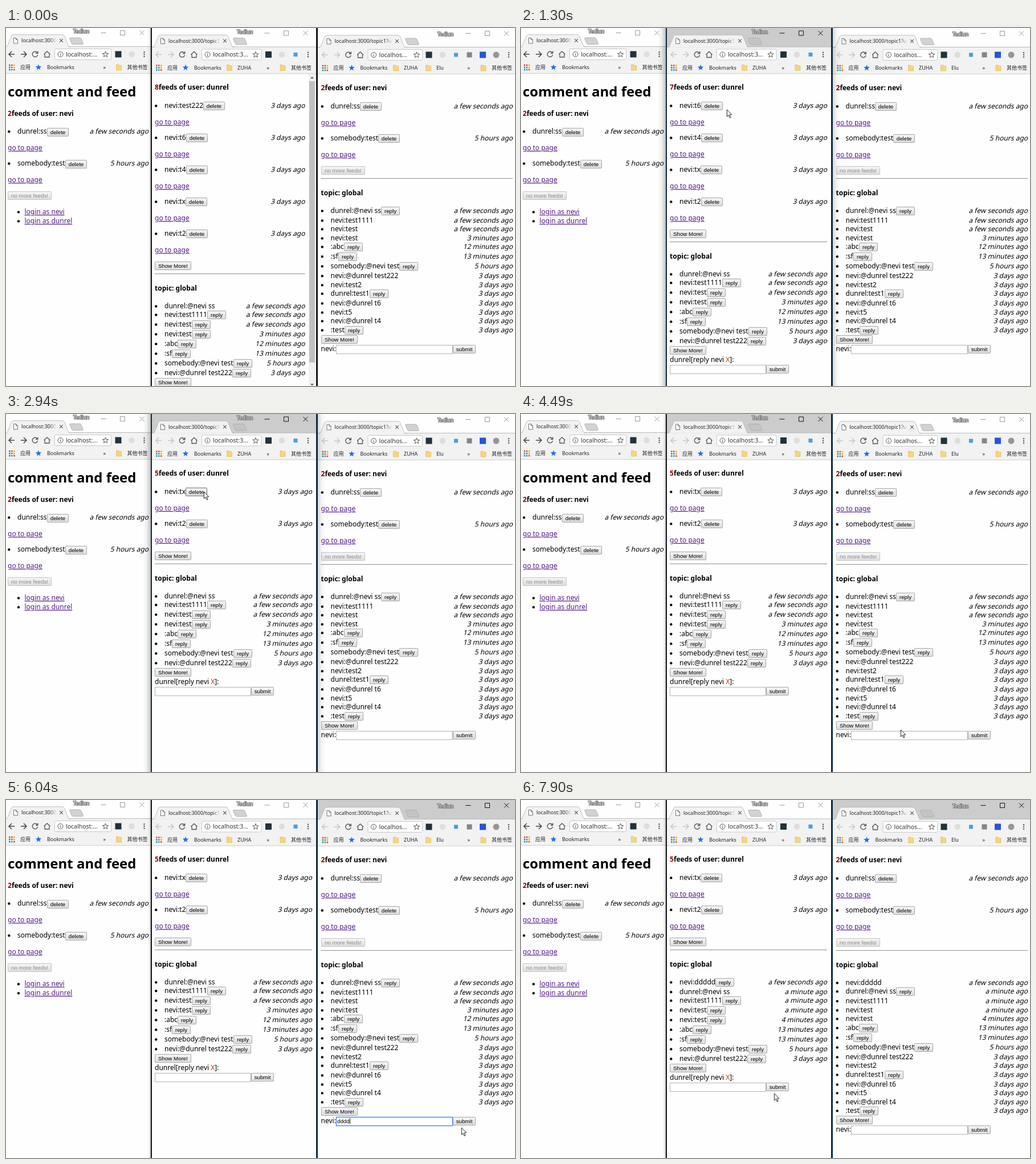
An HTML page for the animation above (7990 ms loop, 893 px wide and 627 px high).

```html
<!DOCTYPE html>
<html lang="en">
<head>
<meta charset="utf-8">
<title>Comments and feeds</title>
<style>
  html, body { margin: 0; width: 100%; height: 100%; overflow: hidden; background: #fff; }
  svg { display: block; width: 893px; height: 627px; }
  text { font: 12px "Noto Sans", "Noto Sans CJK SC", "Noto Sans CJK", sans-serif; white-space: pre; }
  .b { font-weight: 700; }
  .h1 { font-size: 24px; font-weight: 700; }
  .ui { font-size: 9px; fill: #222; }
  .url { font-size: 10.5px; fill: #333; }
  .btn { font: 9.75px "Liberation Sans", Arial, sans-serif; }
  .name { font-size: 9px; fill: #fff; stroke: #555; stroke-width: 1.6px; paint-order: stroke; stroke-linejoin: round; }
  .link { fill: #551a8b; text-decoration: underline; }
</style>
</head>
<body>
<svg id="stage" viewBox="0 0 893 627" xmlns="http://www.w3.org/2000/svg">
  <defs>
    <linearGradient id="face" x2="0" y2="1"><stop stop-color="#f6f6f6"/><stop offset="1" stop-color="#dddddd"/></linearGradient>
    <linearGradient id="fade"><stop stop-color="#f2f2f2" stop-opacity="0"/><stop offset="1" stop-color="#f2f2f2"/></linearGradient>
    <linearGradient id="dark"><stop stop-color="#000" stop-opacity="0"/><stop offset=".5" stop-color="#000" stop-opacity=".06"/><stop offset="1" stop-color="#000" stop-opacity=".25"/></linearGradient>
    <clipPath id="mid"><rect x="254" width="290" height="627"/></clipPath>
    <clipPath id="left"><rect width="254" height="627"/></clipPath>
  </defs>
  <g id="scene"></g>
</svg>
<script>
const LOOP = 7990;
const scene = document.getElementById('scene');
const pen = document.createElement('canvas').getContext('2d');
pen.font = '12px "Noto Sans", sans-serif';
const widthOf = s => pen.measureText(s).width;

const A = 'nevi', B = 'dunrel';
const BTN_W = { delete: 38, reply: 33, submit: 40, 'Show More!': 64, 'no more feeds!': 77 };

// text, age before the new comment, age after it
const COMMENTS = [
  [`${B}:@${A} ss`, 'a few seconds', 'a minute'],
  [`${A}:test1111`, 'a few seconds', 'a minute'],
  [`${A}:test`, 'a few seconds', 'a minute'],
  [`${A}:test`, '3 minutes', '4 minutes'],
  [':abc', '12 minutes', '13 minutes'],
  [':sf', '13 minutes'],
  [`somebody:@${A} test`, '5 hours'],
  ...[`${A}:@${B} test222`, `${A}:test2`, `${B}:test1`, `${A}:@${B} t6`,
      `${A}:t5`, `${A}:@${B} t4`, ':test'].map(s => [s, '3 days'])
];
const MY_FEEDS = [[`${B}:ss`, 'a few seconds'], ['somebody:test', '5 hours']];
const B_FEEDS = ['test222', 't6', 't4', 'tx', 't2'].map(s => [`${A}:${s}`, '3 days']);

// start, end, steps, x, y
const MOVES = [
  [70, 760, 10, 362, 146], [910, 1080, 3, 361, 143], [1760, 1930, 3, 347, 136],
  [3400, 4020, 9, 667, 553], [4190, 4190, 1, 666, 553], [4740, 4960, 4, 666, 551],
  [5800, 6040, 4, 799, 574], [6190, 6290, 2, 803, 566], [6680, 6680, 1, 804, 567],
  [7370, 7900, 8, 444, 514]
];
const DELETES = [1300, 2160, 2940];
const KEYS = [5570, 5650, 5720, 5800, 6450];

let mouse = { x: 0, y: 0 };

function mouseAt(t) {
  let x = 854, y = 664;
  for (const [t0, t1, n, tx, ty] of MOVES) {
    if (t < t0) break;
    const k = Math.floor((t - t0) / (t1 - t0 || 1) * (n - 1)) + 1;
    const p = n === 1 ? 1 : Math.min(1, k / n);
    x += (tx - x) * p;
    y += (ty - y) * p;
  }
  return { x, y };
}

const rect = (x, y, w, h, fill, more = '') =>
  `<rect x="${x}" y="${y}" width="${w}" height="${h}" fill="${fill}" ${more}/>`;
const line = (d, color, w = 1) => `<path d="${d}" fill="none" stroke="${color}" stroke-width="${w}"/>`;
const dot = (x, y, r, fill) => `<circle cx="${x}" cy="${y}" r="${r}" fill="${fill}"/>`;
// y is the middle of the capitals, baselines sit on whole pixels
const base = y => Math.round(y + 4.3);
const text = (x, y, s, cls = '') => `<text x="${x}" y="${base(y)}" class="${cls}">${s}</text>`;
const small = (x, y, s, cls = 'ui') => `<text x="${x}" y="${Math.round(y + 3.2)}" class="${cls}">${s}</text>`;
const bullet = (x, y) => dot(x, base(y) - 3.6, 2.2, '#000');
const age = (x, y, s) =>
  `<text transform="translate(${x} ${base(y)}) skewX(-13)" text-anchor="end">${s} ago</text>`;

function button(left, y, label, off) {
  const x = Math.round(left), top = Math.round(y - 7.5), w = BTN_W[label];
  const hot = mouse.x >= x && mouse.x < x + w && mouse.y >= top && mouse.y < top + 15;
  const edge = off ? '#c4c4c4' : hot ? '#707070' : '#a6a6a6';
  return rect(x + 0.5, top + 0.5, w - 1, 14, 'url(#face)', `stroke="${edge}" rx=".8"`) +
    `<text x="${x + w / 2}" y="${top + 11}" class="btn" text-anchor="middle" fill="${off ? '#8c8c8c' : '#000'}">${label}</text>`;
}

const field = (x, y, w, focus) =>
  rect(x + 0.5, Math.round(y - 8) + 0.5, w - 1, 15, '#fff',
    `stroke="${focus ? '#4d8df0' : '#b4b4b4'}" stroke-width="${focus ? 1.5 : 1}"`);

function feedList(x, right, y, user, count, feeds, more) {
  let s = text(x, y - 31.5, `<tspan fill="#8b0000">${count}</tspan>feeds of user: ${user}`, 'b');
  feeds.forEach(([label, when], i) => {
    const fy = y + 56 * i;
    s += bullet(x + 2.3, fy) + text(x + 17, fy, label) +
      button(x + 17 + widthOf(label), fy + 1, 'delete') +
      age(right, fy, when) + text(x, fy + 29, 'go to page', 'link');
  });
  return s + button(x, y + 0.7 + 56 * feeds.length, more, more[0] === 'n');
}

function topic(x, right, y, user, rows, sent) {
  let s = rect(x, Math.round(y - 56), right - x, 1, '#8f8f8f') + text(x, y - 31, 'topic: global', 'b');
  const list = COMMENTS.slice(0, rows);
  if (sent) list.unshift([`${A}:ddddd`, 'a few seconds']);
  for (const [label, before, after] of list) {
    const reply = !label.startsWith(user + ':');
    s += bullet(x + 2.3, y) + text(x + 17, y, label) + age(right, y, sent && after || before);
    if (reply) s += button(x + 17 + widthOf(label), y + 1, 'reply');
    y += reply ? 17 : 15.5;
  }
  return { y, svg: s + button(x, y, 'Show More!') };
}

function star(x, y, r, attrs) {
  let d = '';
  for (let i = 0; i < 10; i++) {
    const a = Math.PI * i / 5, q = i % 2 ? r * 0.42 : r;
    d += `${i ? 'L' : 'M'}${(x + q * Math.sin(a)).toFixed(2)} ${(y - q * Math.cos(a)).toFixed(2)}`;
  }
  return `<path d="${d}z" ${attrs}/>`;
}

const folder = (x, y) =>
  `<path d="M${x - 4.5} ${y - 5}h4l1 1.5h4v8.5h-9z" fill="#f6d67a" stroke="#dfb44e" stroke-width=".6"/>`;
const arrow = (x, y, dir, color) =>
  line(`M${x - 5 * dir} ${y}h${10 * dir}M${x} ${y - 5}l${5 * dir} 5l${-5 * dir} 5`, color, 1.5);

// Browser frame: tab strip, toolbar and bookmarks
function chrome(w, active) {
  const { x, y, end } = w;
  const ink = active ? '#111' : '#999', grey = '#555';
  const tab = w.close + 1;
  let s = rect(w.from, 0, w.to - w.from, 33 + y, active ? '#cccccc' : '#fefefe') +
    rect(w.from, 33 + y, w.to - w.from, 47, '#f2f2f2') +
    line(`M${w.from} ${32.5 + y}H${w.to}`, '#b9b9b9') +
    line(`M${w.from} ${79.5 + y}H${w.to}`, '#cfcfcf') +
    `<path d="M${x - 1} ${33.2 + y}c3 0 3-1 4-3l6-15q1.5-3.5 4-3.5H${tab + 1}q2.500 0 4 3.500l6 15c1 2 1 3 4 3" fill="#f2f2f2" stroke="#b2b2b2" stroke-width=".8"/>` +
    `<path d="M${tab + 15} ${17 + y}h16q2 0 3 2l3 7q1 2.5-1 2.5h-16q-2 0-3-2l-3-7q-1-2.5 1-2.5z" fill="${active ? '#c4c4c4' : '#d2d2d2'}" stroke="#a9a9a9" stroke-width=".8"/>` +
    `<path d="M${x + 13.5} ${17.5 + y}h4l3 3v6.5h-7zM${x + 17.5} ${17.5 + y}v3h3" fill="#fff" stroke="#666" stroke-width=".9"/>` +
    small(x + 27, 22 + y, w.title) +
    rect(w.close - 21, 14 + y, 13, 16, 'url(#fade)') + rect(w.close - 8, 14 + y, 10, 16, '#f2f2f2') +
    line(`M${w.close - 2.8} ${19.2 + y}l5.6 5.6m0-5.6l-5.6 5.6`, grey, 1.1) +
    small(w.name, w.nameY, 'Tedlun', 'name');
  const cy = w.ctrlY, [mn, mx, cl] = w.ctrl;
  s += line(`M${mn - 4.5} ${cy}h9M${mx - 4} ${cy - 4}h8v8h-8zM${cl - 4} ${cy - 4}l8 8m0-8l-8 8`, ink);

  const ty = 46 + y, nav = w.history ? '#444' : '#c6c6c6';
  s += arrow(x + 10, ty, -1, nav) + arrow(x + 31, ty, 1, nav) +
    line(`M${x + 54.8} ${ty - 2.8}a4.7 4.7 0 1 0 .8 3.6M${x + 55.8} ${ty - 5.5}v3.8h-3.8`, grey, 1.4) +
    line(`M${x + 66.5} ${ty}l5.5-5l5.5 5M${x + 68} ${ty - 0.5}v5.5h8v-5.5`, grey, 1.3) +
    rect(x + 85.5, ty - 9.5, w.star + 10 - x - 85.5, 19, '#fff', 'rx="2" stroke="#bdbdbd" stroke-width=".8"') +
    `<circle cx="${x + 95.5}" cy="${ty}" r="4.5" fill="none" stroke="${grey}"/>` +
    line(`M${x + 95.5} ${ty - 2.6}v1.2m0 1v3`, grey, 1.1) +
    `<text x="${x + 105}" y="${Math.round(ty + 3.7)}" class="url">${w.url}</text>` +
    star(w.star, ty + 0.3, 5.4, `fill="none" stroke="${grey}"`);
  for (const [ix, color, r, round] of w.icons) {
    s += round ? dot(ix, ty, r, color) : rect(ix - r, ty - r, 2 * r, 2 * r, color);
  }
  for (let i = -1; i < 2; i++) s += dot(end - 10, ty + i * 3.8, 1.2, grey);

  const by = 69 + y;
  const [red, gold, green, blue] = ['#dd4b39', '#f0b400', '#2a9d58', '#4285f4'];
  [red, red, gold, green, blue, gold, green, blue, red].forEach((c, i) => {
    s += rect(x + 5 + i % 3 * 4, by - 5.2 + Math.floor(i / 3) * 4, 2.6, 2.6, c);
  });
  s += small(x + 25, by, '应用') + star(x + 57, by, 5.6, 'fill="#1f6fe0"') + small(x + 72, by, 'Bookmarks');
  for (const [fx, label] of w.folders) s += folder(fx, by) + small(fx + 14, by, label);
  return s + small(w.more - 3.5, by, '»') + folder(end - 54.5, by) + small(end - 40, by, '其他书签');
}

const TOOL = '#20323c', PALE = '#dedede';
const WINDOWS = [
  { from: 0, to: 254, x: 0, y: 0, end: 252.5, title: 'localhost:3000', close: 97, name: 118, nameY: 6,
    ctrl: [171, 204.5, 238.5], ctrlY: 8.5, history: true, star: 174.5, url: 'localhost:...',
    icons: [[197, TOOL, 5.5], [220.5, PALE, 5.2, true]], folders: [], more: 174 },
  { from: 254, to: 545, x: 258, y: 0.5, end: 540, title: 'localhost:3000/topic1', close: 384, name: 405, nameY: 6.5,
    ctrl: [458, 491.5, 525.5], ctrlY: 9, star: 438, url: 'localhost:3...',
    icons: [[460.5, TOOL, 5.5], [484, PALE, 5.2, true], [508, '#4b9fdc', 3.5]], folders: [[392, 'ZUHA']], more: 461 },
  { from: 545, to: 893, x: 549.5, y: 1, end: 892, title: 'localhost:3000/topic1?u', close: 686, name: 757, nameY: 10.5,
    ctrl: [811, 844.5, 878], ctrlY: 9.5, star: 720.5, url: 'localhos...',
    icons: [[742, TOOL, 5.5], [766, PALE, 5.2, true], [789.5, '#4b9fdc', 3.5], [813, '#858585', 4.5],
      [836.5, '#2456d6', 5.5], [860, '#969696', 5.5, true]],
    folders: [[684, 'ZUHA'], [741, 'Elu']], more: 813 }
];

function leftPage() {
  return `<text x="3" y="120" class="h1">comment and feed</text>` +
    feedList(3, 250, 181, A, 2, MY_FEEDS, 'no more feeds!') +
    [A, B].map((u, i) => bullet(22, 322 + 15.5 * i) + text(32.5, 322 + 15.5 * i, 'login as ' + u, 'link')).join('');
}

function middlePage(t) {
  const gone = DELETES.filter(k => t >= k).length;
  const right = gone ? 537 : 524.5, x = 261, top = 135.5;
  const feeds = B_FEEDS.slice(gone);
  const list = topic(x, right, top + 70.7 + 56 * feeds.length, B, 8, t >= 7000);
  const y = list.y;
  let s = feedList(x, right, top, B, 8 - gone, feeds, 'Show More!') + list.svg +
    text(x, y + 16, `${B}[reply ${A} <tspan fill="#b8400a">X</tspan>]:`) +
    field(x, y + 32.8, 169, false) + button(x + 169, y + 32.8, 'submit');
  if (!gone) {
    s += rect(531, 80.5, 12, 547, '#f1f1f1') + rect(532, 93, 10, 493, '#c1c1c1') +
      `<path d="M534 88.5l3-3.5l3 3.5zM534 623l3 3.5l3-3.5z" fill="#606060"/>`;
  }
  return s;
}

function rightPage(t) {
  const x = 552.5, right = 889, sent = t >= 6910;
  const list = topic(x, right, 319.3, A, 14, sent);
  const y = list.y + 17, focus = t >= 5110 && !sent;
  const typed = sent ? '' : 'd'.repeat(KEYS.filter(k => t >= k).length);
  let s = feedList(x, right, 136.4, A, 2, MY_FEEDS, 'no more feeds!') + list.svg +
    text(x, y - 0.6, A + ':') + field(579, y + 0.3, 205, focus) + button(784, y, 'submit') +
    `<text x="581" y="${Math.round(y + 3.5)}" class="btn">${typed}</text>`;
  if (focus) s += rect(581.3 + typed.length * 5.42, y - 5, 0.9, 10, '#000');
  return s;
}

// Window edges and the shadow around the focused middle window
function seams(focus) {
  const shade = (x, w, flip = '') => rect(x, 0, w, 627, 'url(#dark)', flip);
  const black = '#151515', navy = '#0d2a40', mid = focus === 1;
  return (mid ? shade(240, 14) + shade(547, 14, 'transform="translate(1108 0) scale(-1 1)" opacity=".6"') : shade(249, 5)) +
    rect(254, 0, 2, 627, mid ? navy : black) +
    rect(544, 0, 3, 627, focus < 0 ? black : navy);
}

function cursor() {
  return `<path transform="translate(${mouse.x.toFixed(2)} ${mouse.y.toFixed(2)})" d="M.4 0v12.2l2.7-2.6l2 4.7l1.9-.8l-2-4.6h3.8z" fill="#fff" stroke="#111" stroke-width=".9"/>`;
}

let last = '';
function render(t) {
  mouse = mouseAt(t);
  const focus = t < 1230 ? -1 : t < 4490 ? 1 : 2;
  const active = focus === 2 && t < 4580 ? 1 : focus;
  const html = rect(0, 0, 893, 627, '#fefefe') +
    `<g clip-path="url(#left)">${leftPage()}${chrome(WINDOWS[0], false)}</g>` +
    rightPage(t) + chrome(WINDOWS[2], active === 2) +
    `<g clip-path="url(#mid)">${middlePage(t)}${chrome(WINDOWS[1], active === 1)}</g>` +
    seams(focus) + (t >= 70 ? cursor() : '');
  if (html !== last) scene.innerHTML = last = html;
}

const start = performance.now();
function tick() {
  render((performance.now() - start) % LOOP);
  requestAnimationFrame(tick);
}
tick();
</script>
</body>
</html>
```
